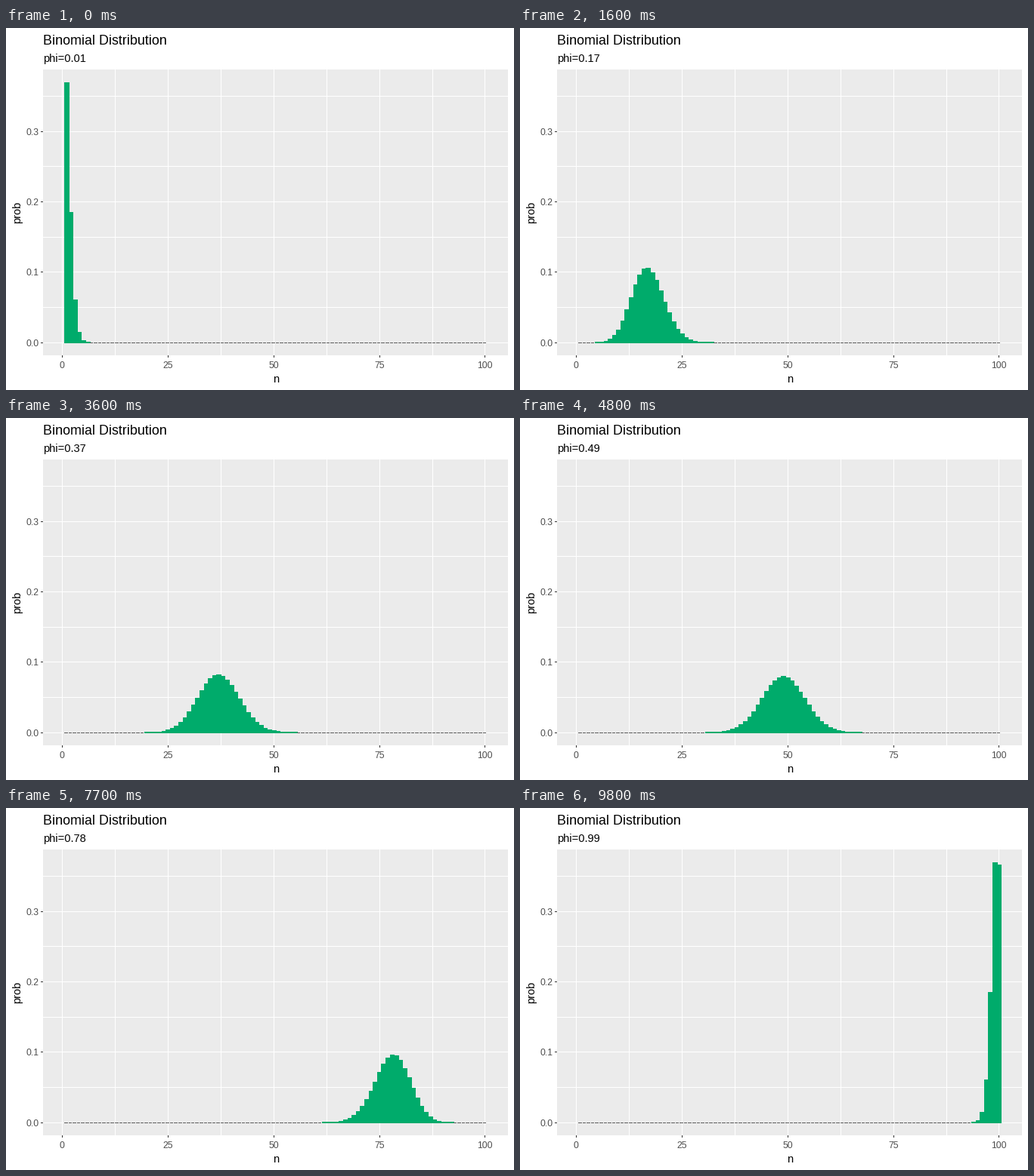
A matplotlib script for the animation above (9.9 s loop, 672 by 480 pixels).

```python
import math

import matplotlib.pyplot as plt
from matplotlib.animation import FuncAnimation
from matplotlib.patches import Rectangle

W, H, DPI = 672, 480, 96
TRIALS = 100
STEPS = 99
X0, X_UNIT = 74.65, 5.593    # pixel of n = 0, pixels per trial
Y0, Y_UNIT = 417.07, 932.5   # pixel of prob = 0, pixels per unit
LEFT, TOP, RIGHT, BOTTOM = 49, 55, 664, 434
GREEN, FLAT = "#00ab6b", "#5f5f5f"
TICK, TICK_TEXT = "#333333", "#4d4d4d"

plt.rcParams["font.family"] = "Liberation Sans"
fig = plt.figure(figsize=(W / DPI, H / DPI), dpi=DPI, facecolor="white")
ax = fig.add_axes([0, 0, 1, 1])
ax.set_xlim(0, W)
ax.set_ylim(H, 0)
ax.axis("off")


def px(n):
    return math.floor(X0 + n * X_UNIT)


def py(prob):
    return math.floor(Y0 - prob * Y_UNIT)


def box(x, y, w, h, color, z=1):
    rect = Rectangle((x, y), w, h, facecolor=color, linewidth=0,
                     antialiased=False, zorder=z)
    return ax.add_patch(rect)


def label(x, y, text, size, color="black", ha="left", **kw):
    return ax.text(x, y, text, fontsize=size, color=color, ha=ha,
                   va="baseline", **kw)


def binomial(n, phi):
    return math.comb(TRIALS, n) * phi ** n * (1 - phi) ** (TRIALS - n)


# Panel, grid and ticks
box(LEFT, TOP, RIGHT - LEFT, BOTTOM - TOP, "#ebebeb")
for i in range(9):
    x = px(12.5 * i)
    box(x, TOP, 1, BOTTOM - TOP, "white", 2)
    if i % 2 == 0:
        box(x, BOTTOM, 1, 3, TICK, 2)
        label(x + 0.3, 451, f"{12.5 * i:.0f}", 9.15, TICK_TEXT, "center")
for i in range(8):
    y = py(0.05 * i)
    box(LEFT, y, RIGHT - LEFT, 1, "white", 2)
    if i % 2 == 0:
        box(LEFT - 3, y, 3, 1, TICK, 2)
        label(43.4, y + 5, f"{0.05 * i:.1f}", 9.15, TICK_TEXT, "right")

label(49, 22, "Binomial Distribution", 13.4)
subtitle = label(49, 45, "", 11)
label(357, 470, "n", 11, ha="center")
label(19.5, 244.5, "prob", 11, ha="center", rotation=90,
      rotation_mode="anchor")

bars = [box(0, 0, 0, 0, GREEN, 3) for _ in range(TRIALS)]


def update(step):
    phi = (step + 1) / 100
    subtitle.set_text(f"phi={phi:.2f}")
    base = py(0)
    for n, bar in enumerate(bars, start=1):
        left, right = px(n - 0.5), px(n + 0.5)
        top = py(binomial(n, phi))
        if top < base:
            bar.set_bounds(left, top, right - left + 1, base - top + 1)
            bar.set_facecolor(GREEN)
        else:
            # Too low for a bar: a short dash on the baseline
            bar.set_bounds(left, base, right - left - 1, 1)
            bar.set_facecolor(FLAT)
    return [subtitle, *bars]


anim = FuncAnimation(fig, update, frames=STEPS, interval=100,
                     repeat=True, repeat_delay=0, blit=False)
plt.show()
```
